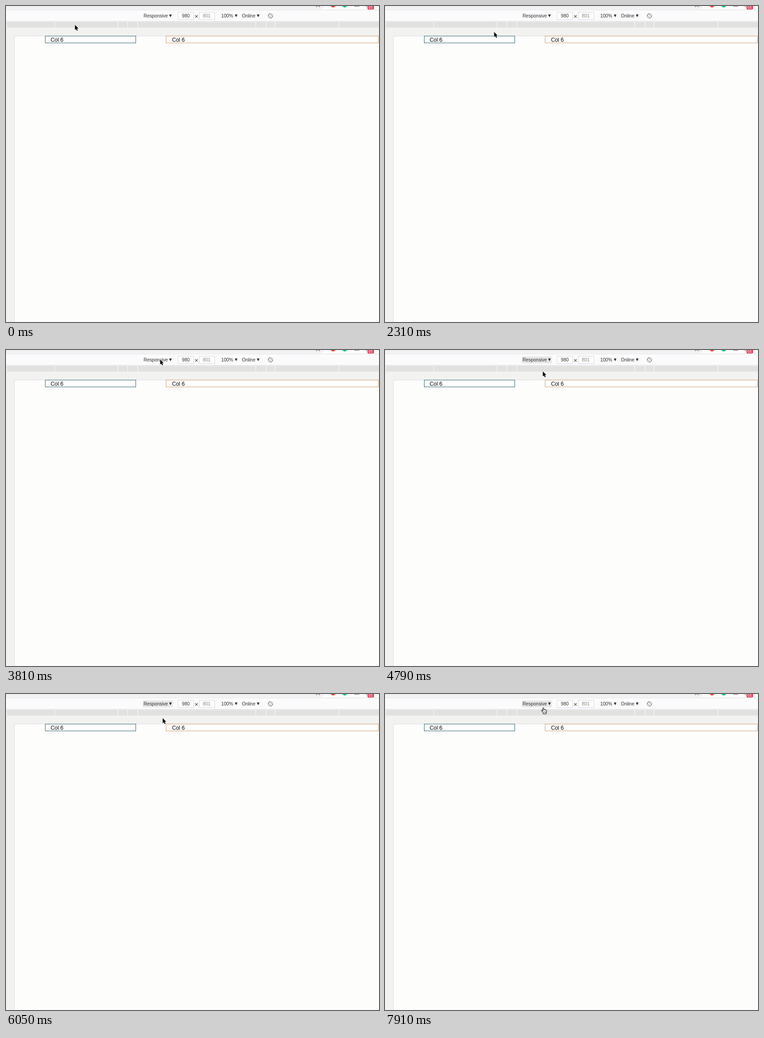
These frames come from a looping animation (812x689 px, 8000 ms). An HTML page with a canvas:

```html
<!DOCTYPE html>
<html lang="en">
<head>
<meta charset="utf-8">
<title>Responsive columns</title>
<style>
html, body { margin: 0; width: 100%; height: 100%; overflow: hidden; background: #fdfdfc; }
canvas { display: block; }
</style>
</head>
<body>
<canvas id="stage" width="812" height="689"></canvas>
<script>
const ctx = document.getElementById('stage').getContext('2d');
const LOOP = 8000;
const FOCUS_AT = 4050;
const HAND_AT = 7350;
const FONT = '"Liberation Sans", Arial, sans-serif';

// time, x, y of the pointer's hot spot
const path = [
  [0, 150, 41], [1150, 122, 29], [2310, 237.5, 56.5], [3810, 335.5, 20.5],
  [4150, 336, 21], [4790, 343.5, 46.5], [6050, 341, 52.5],
  [6900, 341, 52.5], [7700, 345, 29.5], [8000, 345, 29.5]
];

function rect(x, y, w, h, color) {
  ctx.fillStyle = color;
  ctx.fillRect(x, y, w, h);
}

function frame(x, y, w, h, color) {
  rect(x, y, w, h, '#fefefe');
  ctx.strokeStyle = color;
  ctx.lineWidth = 1;
  ctx.strokeRect(x + 0.5, y + 0.5, w - 1, h - 1);
}

function text(s, x, y, size, color) {
  ctx.font = `${size}px ${FONT}`;
  ctx.fillStyle = color;
  ctx.fillText(s, x, y);
}

function disc(x, y, r, color) {
  ctx.fillStyle = color;
  ctx.beginPath();
  ctx.arc(x, y, r, 0, Math.PI * 2);
  ctx.fill();
}

function poly(points, close = true) {
  ctx.beginPath();
  points.forEach(([x, y]) => ctx.lineTo(x, y));
  if (close) ctx.closePath();
}

function select(label, x, arrowX) {
  text(label, x, 25, 10.15, '#303030');
  poly([[arrowX - 3, 18.5], [arrowX + 3, 18.5], [arrowX, 24.5]]);
  ctx.fillStyle = '#303030';
  ctx.fill();
}

function browserBar() {
  rect(0, 0, 812, 8, '#fcfcfc');
  ctx.fillStyle = '#f1f1f1';
  ctx.beginPath();
  ctx.roundRect(-20, -20, 712, 27, 8);
  ctx.fill();
  ctx.strokeStyle = '#666';
  ctx.lineWidth = 1.2;
  poly([[675, 2], [679, -1], [683, 2]], false);
  ctx.stroke();
  disc(712, -2.5, 5.7, '#ee4a38');
  disc(737.5, -2.5, 5.7, '#15c39a');
  ctx.strokeStyle = '#666';
  ctx.lineWidth = 1;
  ctx.strokeRect(758.5, -6.5, 10, 7);
  rect(783, 0, 3, 1, '#777');
  ctx.fillStyle = '#e5304f';
  ctx.beginPath();
  ctx.roundRect(787, -6, 14, 13.5, 2);
  ctx.fill();
  text('65', 788.7, 5.7, 9, '#fff');
}

function rotateIcon() {
  ctx.save();
  ctx.translate(575.6, 21.6);
  ctx.strokeStyle = '#666';
  ctx.lineWidth = 0.9;
  ctx.beginPath();
  ctx.arc(0, 0, 5, 0, Math.PI * 2);
  ctx.stroke();
  ctx.rotate(-Math.PI / 4);
  ctx.strokeRect(-2, -4.6, 4, 9.2);
  ctx.restore();
}

function toolbar(focused) {
  rect(0, 8, 812, 25, '#fbfbfb');
  rect(0, 8, 812, 1, '#dedeee');
  if (focused) rect(298, 14, 65, 15, '#e7e7e7');
  select('Responsive', 299.5, 358);
  frame(374, 13, 35, 17, '#d8d8d8');
  text('980', 383, 25, 10.15, '#303030');
  ctx.strokeStyle = '#444';
  ctx.lineWidth = 1.1;
  for (const d of [-2.7, 2.7]) {
    poly([[414.6 - 2.7, 22.6 - d], [414.6 + 2.7, 22.6 + d]], false);
    ctx.stroke();
  }
  frame(420, 13, 35, 17, '#d8d8d8');
  text('801', 428.5, 25, 10.15, '#858585');
  select('100%', 468.5, 501);
  select('Online', 513.5, 549);
  rotateIcon();
}

function page() {
  rect(0, 33, 812, 656, '#f2f2f0');
  rect(0, 33, 812, 1, '#d8d8ee');
  rect(2, 35, 810, 12, '#e1e1df');
  for (const x of [105, 243, 264, 286, 543, 565, 585, 724]) rect(x, 35, 1.5, 12, '#f5f5f4');
  rect(18, 65, 794, 624, '#fdfdfc');
  rect(18, 65, 794, 1, '#dedee6');
  rect(18, 65, 1, 624, '#dededf');
  frame(85, 65, 198, 16, '#316a70');
  text('Col 6', 97.2, 77.5, 11.9, '#080808');
  frame(348, 65, 463, 16, '#d0a070');
  text('Col 6', 361.4, 77.5, 11.9, '#080808');
}

function pointerAt(t) {
  const i = path.findIndex((p, k) => k > 0 && t <= p[0]);
  const [t0, x0, y0] = path[i - 1];
  const [t1, x1, y1] = path[i];
  const u = (t - t0) / (t1 - t0);
  const e = u * u * (3 - 2 * u);
  return [x0 + (x1 - x0) * e, y0 + (y1 - y0) * e];
}

function arrow() {
  poly([[0, 0], [0, 11.2], [2.5, 8.9], [4.4, 13], [6.4, 12.1], [4.5, 8.1], [7.8, 8.1]]);
  ctx.lineJoin = 'round';
  ctx.strokeStyle = '#fff';
  ctx.lineWidth = 1.6;
  ctx.stroke();
  ctx.fillStyle = '#080808';
  ctx.fill();
}

function hand() {
  ctx.beginPath();
  ctx.moveTo(-2, 9);
  ctx.lineTo(-4.2, 6.8);
  ctx.quadraticCurveTo(-4.2, 5, -2.4, 5.5);
  ctx.lineTo(-0.8, 7);
  ctx.lineTo(-1.4, 1.6);
  ctx.quadraticCurveTo(-0.5, -0.5, 0.7, 1.2);
  ctx.lineTo(1.4, 5);
  ctx.quadraticCurveTo(2.7, 3.9, 3.4, 5.2);
  ctx.quadraticCurveTo(4.8, 4.5, 5.3, 5.9);
  ctx.quadraticCurveTo(7, 5.6, 6.9, 7.5);
  ctx.lineTo(6.3, 11);
  ctx.lineTo(5.3, 14);
  ctx.lineTo(0.2, 14);
  ctx.closePath();
  ctx.fillStyle = '#fff';
  ctx.fill();
  ctx.strokeStyle = '#161616';
  ctx.lineWidth = 1.1;
  ctx.lineJoin = 'round';
  ctx.stroke();
  ctx.lineWidth = 0.7;
  for (const x of [1.3, 3.1, 4.9]) {
    poly([[x, 8.5], [x, 11.7]], false);
    ctx.stroke();
  }
}

function draw(t) {
  page();
  browserBar();
  toolbar(t >= FOCUS_AT);
  ctx.save();
  ctx.translate(...pointerAt(t));
  (t >= HAND_AT ? hand : arrow)();
  ctx.restore();
}

const start = performance.now();
function tick() {
  draw((performance.now() - start) % LOOP);
  requestAnimationFrame(tick);
}
tick();
</script>
</body>
</html>
```
